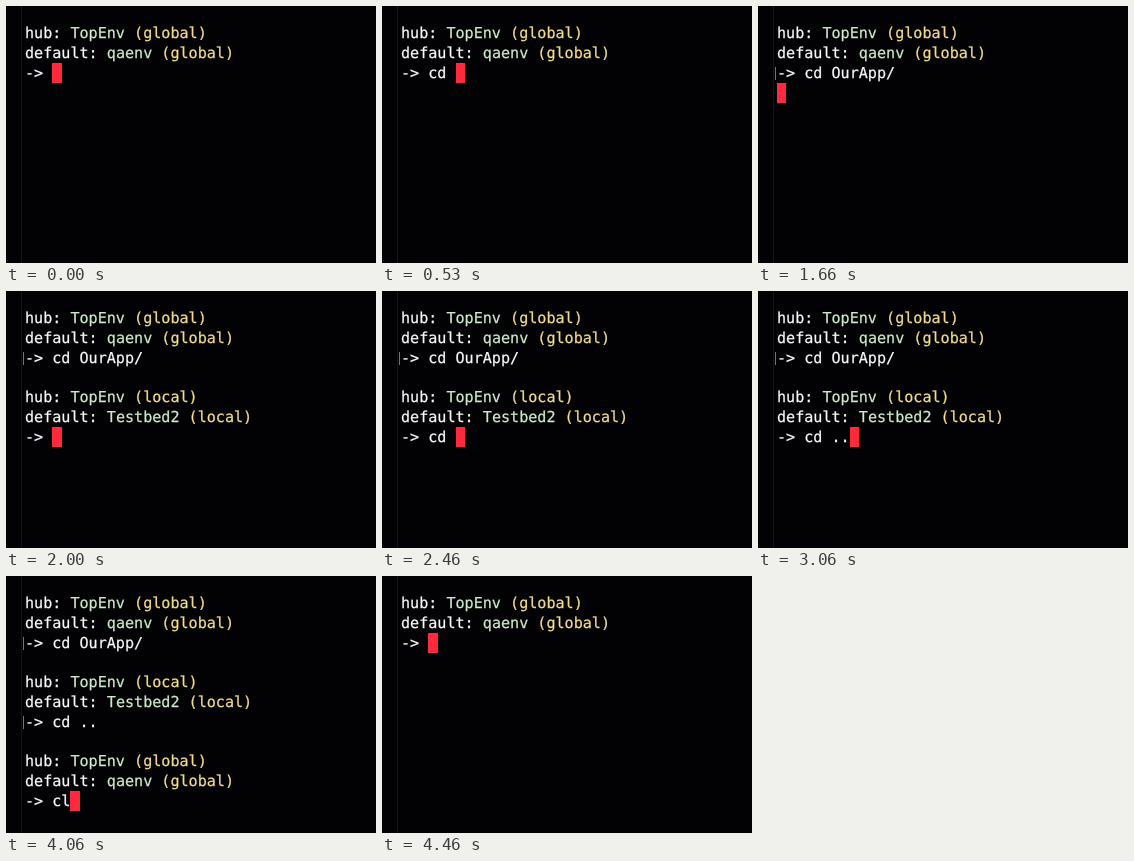
These frames come from a looping animation (370x257 px, 5.06 s). An HTML page:

```html
<!DOCTYPE html>
<html lang="en">
<head>
<meta charset="utf-8">
<title>Terminal session</title>
<style>
  html, body { margin: 0; width: 100%; height: 100%; overflow: hidden; background: #020204; }
  #term {
    position: relative; width: 370px; height: 257px; overflow: hidden;
    font: 15.1px/19.75px "DejaVu Sans Mono", monospace;
    text-rendering: geometricPrecision; font-variant-ligatures: none;
    -webkit-text-stroke: 0.25px; color: #f8f8f8;
  }
  #term div { position: absolute; white-space: pre; }
  #edge { left: 15px; top: 0; width: 1px; height: 257px; background: #161618; }
  .row { left: 19px; }
  .mark { left: 17px; width: 1px; height: 13px; background: #777; }
  #cursor { width: 9.3px; height: 20px; background: #ff2a3b; }
  .org { color: #cdeacb; }
  .scope { color: #f3dc8a; }
</style>
</head>
<body>
<div id="term">
  <div id="edge"></div>
  <div id="cursor"></div>
</div>
<script>
const LOOP = 5060, KEY = 65, REPLY = 65;
const LEFT = 19, TOP = 18.45, CELL = 9.09, LINE = 19.75, BLOCK_ROWS = 4;

// Each burst is typed one key per KEY ms from its start time.
const BLOCKS = [
  { org: 'qaenv', scope: 'global', enter: 1660,
    bursts: [{ at: 400, text: 'cd ' }, { at: 600, text: 'OurApp/' }] },
  { org: 'Testbed2', scope: 'local', enter: 3130,
    bursts: [{ at: 2330, text: 'cd ' }, { at: 2800, text: '..' }] },
  { org: 'qaenv', scope: 'global', enter: 4395,
    bursts: [{ at: 3990, text: 'clear' }] }
];

const term = document.getElementById('term');
const cursor = document.getElementById('cursor');
const rowTop = row => TOP + row * LINE;

function addDiv(className, top) {
  const div = document.createElement('div');
  div.className = className;
  div.style.top = top + 'px';
  term.append(div);
  return div;
}

const info = (label, org, scope) =>
  `${label}: <span class="org">${org}</span> <span class="scope">(${scope})</span>`;

const views = BLOCKS.map(({ org, scope }, i) => {
  const row = i * BLOCK_ROWS;
  const hub = addDiv('row', rowTop(row));
  const main = addDiv('row', rowTop(row + 1));
  const prompt = addDiv('row', rowTop(row + 2));
  const mark = addDiv('mark', rowTop(row + 2) + 3);
  hub.innerHTML = info('hub', 'TopEnv', scope);
  main.innerHTML = info('default', org, scope);
  return { lines: [hub, main, prompt], prompt, mark };
});

const show = (el, on) => { el.style.visibility = on ? 'visible' : 'hidden'; };

const typedAt = (bursts, t) => bursts.map(({ at, text }) =>
  text.slice(0, Math.max(0, Math.floor((t - at) / KEY) + 1))).join('');

function render(time) {
  // After the last reply the screen is back at its opening state.
  const replies = BLOCKS.filter(b => time >= b.enter + REPLY).length;
  const active = replies % BLOCKS.length;
  const t = replies === BLOCKS.length ? 0 : time;

  views.forEach((view, i) => {
    const { bursts, enter } = BLOCKS[i];
    view.lines.forEach(line => show(line, i <= active));
    show(view.mark, t >= enter);
    view.prompt.textContent = '-> ' + typedAt(bursts, t);
  });

  const entered = t >= BLOCKS[active].enter;
  const row = active * BLOCK_ROWS + (entered ? 3 : 2);
  const col = entered ? 0 : views[active].prompt.textContent.length;
  cursor.style.left = LEFT + col * CELL + 'px';
  cursor.style.top = Math.floor(rowTop(row)) + 'px';
}

const start = performance.now();

function tick() {
  render((performance.now() - start) % LOOP);
  requestAnimationFrame(tick);
}
tick();
</script>
</body>
</html>
```
